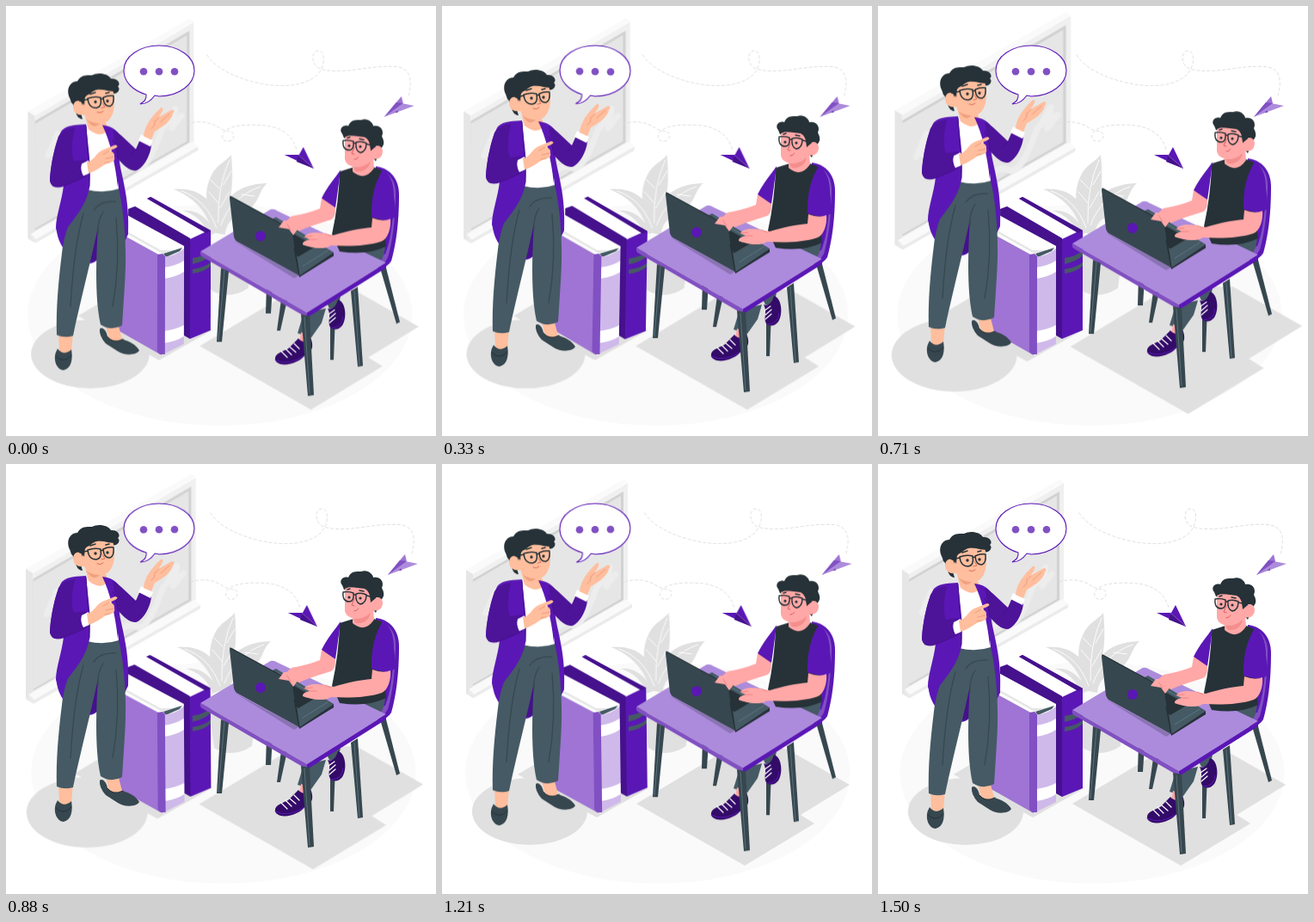
An HTML page that plays this animation: 500x500 px, repeating every 1.54 s.

```html
<!DOCTYPE html>
<html lang="en">
<head>
<meta charset="utf-8">
<title>Tutoring scene</title>
<style>
html, body { margin: 0; width: 100%; height: 100%; overflow: hidden; background: #fff; }
svg { display: block; width: 100vw; height: 100vh; }
.p { fill: #5a17b5 } .pd { fill: #45118c } .pm { fill: #8150c2 } .pl { fill: #9f74d4 } .pt { fill: #ac8bdc } .px { fill: #cfb9ea }
.k { fill: #263238 } .g { fill: #37474f } .s { fill: #455a64 } .w { fill: #fff } .e { fill: #e0e0e0 }
.sleeve { fill: #4d1399 } .shoe { fill: #330b68 }
.a { fill: #ffbe9d } .b { fill: #ffa8a7 } .ln { fill: none; stroke-linecap: round; stroke-linejoin: round }
</style>
</head>
<body>
<svg viewBox="0 0 500 500">

<g class="shake"><ellipse cx="249" cy="359" rx="223.5" ry="129" fill="#fafafa"/></g>

<g id="shadow" class="e">
  <ellipse cx="102" cy="404" rx="67" ry="39"/>
  <path d="M88 361L180 411 240 377 140 330Z"/>
  <path d="M226 395L352 467 433 418 417 408 474 373 400 331H333Z"/>
</g>

<g id="board">
  <path fill="#fafafa" d="M28 123L211 18 216 21 36 128Z"/>
  <path fill="#e6e6e6" d="M28 123L36 128V272L28 267Z"/>
  <path fill="#f0f0f0" d="M36 128L216 22V161L36 266Z"/>
  <path fill="#d2d2d2" d="M36 134L211 32V158L36 258Z"/>
  <path fill="#e6e6e6" d="M36 137L208 37V157L36 256Z"/>
  <path class="ln" stroke="#ededed" stroke-width="7" d="M51 173L62 148 59 171 73 149M120 204Q138 180 150 187T180 143M183 140L195 120 191 142 202 128"/>
  <path fill="#fafafa" d="M31 262L215 157 221 163 37 268Z"/>
  <path fill="#ebebeb" d="M31 262L37 268 221 163V167L37 272 31 268Z"/>
</g>

<g class="shake">
  <g class="ln" stroke="#dedede" stroke-dasharray="3 3">
    <path d="M234 57C251 86 335 108 363 79C371 70 372 53 364 52C355 51 353 71 369 74C397 80 428 67 457 71C474 75 471 93 468 105"/>
    <path d="M211 137C227 132 241 136 250 143C259 147 266 144 265 152C263 160 250 159 252 150C255 138 282 137 302 139C324 142 334 153 338 167"/>
  </g>
  <path class="p" d="M324 173L341 173 358 189ZM346 164L358 189 341 173Z"/>
  <path class="pd" d="M341 173L358 189 338 181Z"/>
  <path class="ln" stroke="#9f74d4" stroke-width=".7" d="M340 173L357 188"/>
  <path class="pl" d="M440 129L460 105 462 113Z"/>
  <path class="pt" d="M440 129L475 116 460 113Z"/>
  <path class="pm" d="M440 129L462 113 454 112ZM452 124L456 121 456 124Z"/>
  <g class="e">
    <path d="M245 257C230 237 231 212 239 197C245 184 256 181 262 173C265 204 264 227 249 257Z"/>
    <path d="M240 264C235 238 216 221 195 213C223 211 244 222 249 264Z"/>
    <path d="M245 264C247 229 265 207 304 206C291 218 297 234 267 246Q256 252 255 266Z"/>
    <path d="M206 238Q229 235 244 264L236 267Q229 245 206 238Z"/>
    <path d="M232 282H288L282 328Q259 343 238 330Z"/>
  </g>
  <path class="ln" stroke="#fff" stroke-width=".9" d="M247 252Q246 210 260 179M247 229L236 216M248 212L238 202M249 235L260 216M253 208L262 192M245 258Q233 225 204 215M250 255Q262 222 296 210M263 230L281 232M274 219L289 221"/>
</g>

<g id="books">
  <path class="w" d="M150 237L166 226 233 263 211 272Z"/>
  <path class="pd" d="M142 236L150 233 214 270V387L207 383V279L142 244Z"/>
  <path class="p" d="M164 224L168 222 238 261V377L214 387V271L231 263Z"/>
  <path class="pd" d="M164 224L168 222 238 261 233 264Z"/>
  <path class="s" d="M217 293Q231 291 238 284V290Q231 297 217 300ZM217 306Q231 304 238 298V302Q231 309 217 311Z"/>
  <path class="pl" d="M128 262L139 268 181 291V406L128 376Z"/>
  <path class="w" d="M135 246L142 244 207 280 182 289 135 264Z"/>
  <path fill="#e6e6e6" d="M135 262L182 288 196 284 180 284 135 259Z"/>
  <path class="s" d="M183 288L205 281 202 285 186 292Z"/>
  <path class="px" d="M182 292Q197 291 207 282V393L183 405Z"/>
  <path class="w" d="M184 304Q198 302 207 296V309Q198 315 184 317ZM184 378Q198 376 207 371V384Q198 390 184 392Z"/>
  <path class="pm" d="M176 289L182 288 185 291V405L179 405 176 402Z"/>
</g>

<g id="teacher" class="float">
  <path class="p" d="M62 240L59 262C61 281 77 299 96 300Q104 300 109 292L114 230Z"/>
  <path class="pd" d="M92 250H114L108 293Q101 300 94 298Z"/>
  <path class="p" d="M112 139L128 146 132 182C135 201 144 226 142 266L137 276 124 232Z"/>
  <path class="a" d="M61 380H78L76 403Q68 409 62 403ZM115 369H130L135 388Q130 398 121 391Z"/>
  <path class="g" d="M58 403C55 411 58 423 67 424C76 422 78 411 76 400Q67 408 60 399ZM109 376C112 373 117 378 118 385Q126 393 136 388C144 391 151 394 155 401C152 407 137 407 130 402L116 393Q108 384 109 376Z"/>
  <path class="ln" stroke="#263238" stroke-width="1" d="M58 408Q67 417 76 407M118 385Q124 394 136 388"/>
  <path class="s" d="M96 213H131C138 241 141 288 138 325L135 372Q122 379 110 371C104 344 104 304 107 257C101 288 88 337 78 384Q68 387 59 383C58 353 61 320 65 288C69 253 84 230 96 213Z"/>
  <path class="ln" stroke="#37474f" stroke-width="1.2" d="M102 238Q109 227 128 228M107 265Q106 250 113 240M90 242Q79 280 75 350M128 247Q133 300 124 350"/>
  <path class="w" d="M94 141L119 142C127 165 128 188 131 213Q114 219 94 214Z"/>
  <path class="a" d="M92 128L114 132 119 143Q112 156 96 144Z"/>
  <path class="p" d="M93 138C84 139 72 138 65 145C57 158 52 185 51 203C53 212 60 211 67 209C65 227 58 245 58 259Q60 267 63 271C70 257 92 238 97 212C100 187 95 163 93 138Z"/>
  <path class="sleeve" d="M80 142Q74 168 79 181L93 179V198L68 210Q53 215 51 204Q52 180 61 152Q67 143 80 142Z"/>
  <path class="ln" stroke="#45118c" d="M93 140Q96 180 97 210M68 209Q88 202 93 198"/>
  <path class="p" d="M112 139C121 140 127 143 132 150L130 184 130 211Q125 166 112 139Z"/>
  <path class="sleeve" d="M124 144Q130 147 134 151L151 167 158 151 169 162C168 175 159 190 151 192C143 192 137 186 130 178Z"/>
  <path class="ln" stroke="#45118c" d="M130 178Q128 163 124 156M151 167L145 175"/>
  <path class="w" d="M157 150L171 157 168 164 154 157ZM88 184L96 180 97 195 90 198Q86 191 88 184Z"/>
  <path class="a" d="M160 152C161 140 169 129 180 119C184 118 183 123 177 130L193 121Q198 121 193 127L194 127C190 136 181 142 173 146L169 156Z"/>
  <path class="ln" stroke="#e88d70" stroke-width=".7" d="M173 134Q174 140 169 143M178 130L174 134M190 126L180 135"/>
  <path class="a" d="M94 182C102 181 104 172 112 168L127 162Q132 163 127 166L120 169Q127 170 126 176Q128 181 120 183C113 184 109 191 96 195Z"/>
  <path class="ln" stroke="#e88d70" stroke-width=".7" d="M120 169L113 173M125 176L116 178M121 182L115 183"/>
  <path class="k" d="M73 105C70 95 76 88 83 88C87 80 95 81 100 81C107 77 119 79 122 85C130 84 134 91 130 94Q134 98 128 102L93 108 91 122 85 118 89 132C79 131 82 117 76 113Q75 109 73 105Z"/>
  <path class="a" d="M92 104Q99 98 105 97Q116 99 124 97C127 109 127 122 122 130Q117 139 106 136Q96 135 91 127Q80 129 78 119C78 108 88 109 91 116Z"/>
  <path class="k" d="M89 116Q90 105 97 103Q103 97 111 97Q118 100 130 100L127 90H91L84 104Z"/>
  <g class="ln" stroke="#263238" stroke-width="1.5">
    <path d="M95 108Q103 105 110 107Q112 118 105 119Q96 119 95 108ZM113 107Q119 104 125 105Q126 115 121 117Q114 118 113 107ZM110 109L113 108M95 109L86 111"/>
    <path d="M98 103L104 101M116 102L120 101"/>
  </g>
  <circle class="k" cx="104" cy="112" r="1.7"/><circle class="k" cx="118" cy="111" r="1.7"/>
  <path class="ln" stroke="#d96d58" stroke-width="1" d="M112 113L115 118 111 119M106 124Q110 126 113 123"/>
  <path fill="#e88d70" d="M93 132Q100 137 109 137Q104 143 98 138Z" opacity=".6"/>
</g>

<g id="bubble">
  <path class="w" stroke="#5a17b5" stroke-width="1.1" d="M156 114Q164 110 163 103C147 98 137 88 137 75C137 59 155 46 178 46S219 59 219 75S201 105 178 105L173 104Q166 114 156 114Z"/>
  <g class="pm"><circle cx="160" cy="76.3" r="4.3"/><circle cx="178" cy="76.3" r="4.3"/><circle cx="196" cy="76.3" r="4.3"/></g>
</g>

<g id="desk" class="float">
  <g class="g">
    <path d="M303 325H310L308 358H302Z"/><path d="M320 342H327L319 378H315Z"/>
    <path d="M377 360H383L381 412H377Z"/><path d="M435 305L442 305 458 368 454 370Z"/>
  </g>
  <path class="p" d="M430 187C447 189 457 202 457 220C457 255 453 279 448 297Q444 304 433 307L426 295Z"/>
  <path class="pm" d="M442 194Q454 203 453 222Q452 266 444 293Q440 301 432 303L424 290Z"/>
  <path class="p" d="M442 194Q451 203 451 222Q450 266 441 289L424 292Z"/>
  <path class="s" d="M389 282L414 275 441 277Q441 292 432 303L399 290ZM346 358L372 352 367 369 355 386 339 381ZM373 346L389 338 386 352 376 352Z"/>
  <path class="b" d="M343 380L354 383 353 394 341 391Z"/>
  <path class="shoe" d="M340 387Q347 395 354 386C358 395 357 403 348 406C342 415 322 422 314 414C310 406 319 403 328 399Z"/>
  <path class="shoe" d="M374 352Q382 355 386 342C395 344 397 363 391 372Q384 380 377 374C373 367 379 362 374 352Z"/>
  <path class="ln" stroke="#fff" stroke-width="1.2" d="M335 393L341 399M330 397L337 403M325 399L332 406M320 402L327 409M375 359L382 354M376 364L383 358M376 369L383 363"/>
  <path class="ln" stroke="#5a17b5" d="M313 412Q328 420 347 407M378 375Q391 375 392 362"/>
  <path class="pt" d="M226 286L306 238Q310 235 316 239L442 299 350 357Z"/>
  <path class="pm" d="M226 286L350 357V363L228 292Q225 290 226 286Z"/>
  <path class="p" d="M350 357L442 299V305L350 363Z"/>
  <g class="g">
    <path d="M250 305L259 309 251 391 245 391Z"/>
    <path d="M343 359L353 361 358 453 351 454Z"/>
    <path d="M401 332L409 327 415 419 409 420Z"/>
  </g>
  <path class="ln" stroke="#607d8b" stroke-width=".8" d="M254 308L247 389M347 362L353 451M405 332L411 418"/>

  <path class="k" d="M388 193L404 188H428L438 192C430 212 432 231 438 247L442 280Q420 291 388 286L379 266Q387 229 388 193Z"/>
  <path class="b" d="M403 176H427L428 189Q417 205 403 193Z"/>
  <path class="p" d="M389 191C383 200 373 211 367 224Q374 232 383 235Q386 215 389 191ZM438 191Q446 195 449 207L454 245Q445 253 425 246Q424 213 438 191Z"/>
  <path class="b" d="M367 224L383 235C383 242 382 247 378 249C363 254 348 258 339 263L332 269Q323 266 317 258L332 245Q350 242 365 236Z"/>
  <path fill="#263238" opacity=".25" d="M264 273L335 317 382 291 373 287 341 314Z"/>
  <path class="s" d="M306 250L314 246 381 287 341 314 300 277Z"/>
  <path class="k" d="M312 252L337 267 360 280 340 292 310 271ZM341 314L381 287V291L341 316Z"/>
  <path class="ln" stroke="#607d8b" stroke-width=".8" d="M317 251L365 281M345 303L374 285"/>
  <path class="g" d="M260 224Q260 220 264 223L333 261 341 314 268 274Q266 272 265 269Z"/>
  <path class="ln" stroke="#263238" stroke-width="1.2" d="M261 222L333 261 341 314M335 282L341 314"/>
  <circle class="p" cx="296" cy="268" r="6"/>
  <path class="b" d="M317 258L323 250 337 250 340 259 334 267 329 260Z"/>
  <path class="b" d="M426 247Q439 252 447 248C448 259 444 271 437 274C420 280 397 280 378 279C368 285 353 281 345 278Q344 274 353 272L347 269C350 264 359 263 370 265L381 267C397 262 412 259 425 258Z"/>
  <path class="ln" stroke="#e97474" stroke-width=".7" d="M353 272L361 272M347 269L356 268M371 265L378 268M327 254L331 261"/>

  <path class="k" d="M391 149C386 143 393 138 398 140C401 132 408 133 413 133C420 130 427 136 427 140C436 138 440 146 437 152Q442 161 436 166L430 181 422 172 420 157 393 154Z"/>
  <path class="b" d="M394 153Q405 147 419 152Q423 157 424 167C428 162 437 161 438 169C438 177 432 180 426 178Q420 189 407 188Q396 187 394 179Z"/>
  <path class="k" d="M392 151Q390 143 401 144L420 143Q432 148 430 164L424 169Q424 156 417 153Q405 151 392 151Z"/>
  <g class="ln" stroke="#263238" stroke-width="1.4">
    <path d="M392 157Q398 156 404 158Q405 168 399 168Q391 168 392 157ZM407 159Q413 157 419 160Q419 170 412 171Q406 169 407 159ZM404 160H407M419 161L428 163"/>
    <path d="M397 154L400 153M411 155L416 156"/>
  </g>
  <circle class="k" cx="399" cy="163" r="1.6"/><circle class="k" cx="412" cy="164" r="1.6"/>
  <path class="ln" stroke="#d95f63" stroke-width="1" d="M405 165L402 172 405 173M405 179Q408 179 410 176"/>
  <path fill="#e97474" opacity=".5" d="M404 188Q416 189 424 181Q421 194 407 193Z"/>
</g>
</svg>

<script>
const PERIOD = 1540, LEAD = 40;

// steps: [offset, value]; linear between them
function loop(sel, steps, toCss, origin) {
  const frames = steps.map(([offset, v]) => ({ offset, transform: toCss(v) }));
  for (const el of document.querySelectorAll(sel)) {
    if (origin) el.style.transformOrigin = origin;
    el.animate(frames, { duration: PERIOD, delay: -LEAD, iterations: Infinity });
  }
}

const shiftX = v => `translate(${v}px, 0px)`;
const shiftY = v => `translate(0px, ${v}px)`;
const scale = v => `scale(${v})`;
const turn = v => `rotate(${v}deg)`;

const beat = [[0, 1], [.1, 1.1], [.3, 1], [.4, 1], [.5, 1.1], [.7, 1], [1, 1]];
const sway = [[0, 0], [.25, 1], [.75, -1], [1, 0]];
const shake = [[0, 0], [.1, -1], [.2, 2], [.3, -4], [.4, 4], [.5, -4], [.6, 4], [.7, -4], [.8, 2], [.9, -1], [1, 0]];

loop('.float', [[0, 0], [.5, -10], [1, 0]], shiftY);
loop('.shake', shake, shiftX);
loop('#shadow', beat, scale, '254.5px 383px');
loop('#board', beat, scale, '124.5px 144.5px');
loop('#bubble', sway, turn, '178px 80px');
loop('#books', sway, turn, '186px 314px');
</script>
</body>
</html>
```
